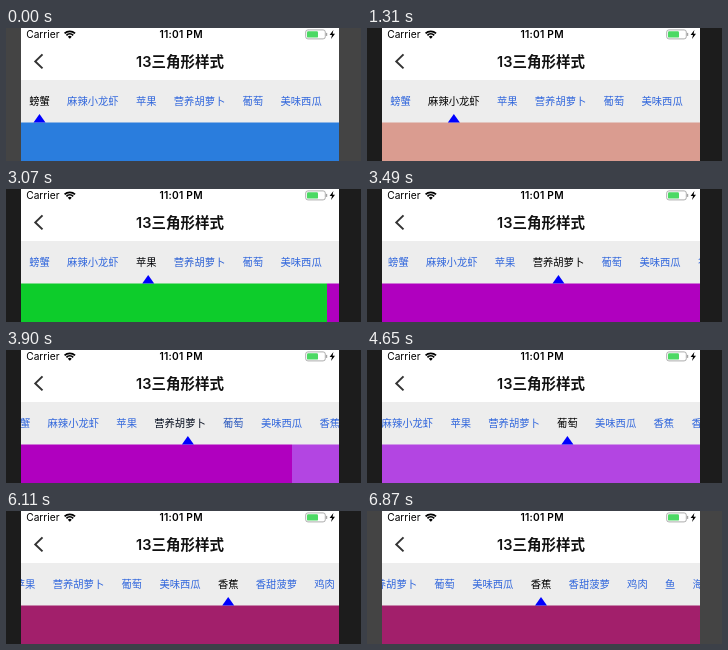
An HTML page with a canvas for the animation above (6.97 s loop, 355x133 px).

```html
<!DOCTYPE html>
<html lang="zh">
<head>
<meta charset="utf-8">
<title>13三角形样式</title>
<style>
html, body { margin: 0; width: 100%; height: 100%; overflow: hidden; background: #1c1c1c; }
canvas { display: block; width: 355px; height: 133px; }
</style>
</head>
<body>
<canvas id="stage"></canvas>
<script>
const W = 355, H = 133, LOOP = 6970;
const LEFT = 15, RIGHT = 333, WIDTH = RIGHT - LEFT, MID = (LEFT + RIGHT) / 2;
const BAR_TOP = 52, BAR_BOTTOM = 94.5;
const EM = 10.3, GAP = 17.3;
const LATIN = 'Inter, "Liberation Sans", sans-serif';
const CJK = '"Noto Sans CJK SC", "Noto Sans CJK", sans-serif';
const NORMAL = [48, 102, 220], SELECTED = [0, 0, 0];
const PAGES = ['#2a7ddd', '#da9c90', '#0dcc2b', '#b000bf', '#b345e2', '#bce030', '#a21f6b'];
const NAMES = ['螃蟹', '麻辣小龙虾', '苹果', '营养胡萝卜', '葡萄', '美味西瓜',
  '香蕉', '香甜菠萝', '鸡肉', '鱼', '海鲜'];

let edge = 23.2;
const tabs = NAMES.map(name => {
  const tab = { name, x: edge, mid: edge + name.length * EM / 2 };
  edge += name.length * EM + GAP;
  return tab;
});
const centred = i => tabs[i].mid - MID;

const linear = k => k;
const easeOut = k => 1 - (1 - k) ** 2.4;
const easeInOut = k => k * k * (3 - 2 * k);

// [time, value, easing used to arrive there]
const pageKeys = [
  [0, 0], [690, 0], [780, 0.467, linear], [990, 0.467], [1310, 1, easeOut],
  [2220, 1], [2370, 1.527, linear], [2570, 1.527], [2890, 2, easeOut],
  [3050, 2], [3070, 2.034, linear], [3190, 2.45, linear], [3440, 3, easeOut],
  [3760, 3], [3900, 3.145, k => k * k], [4020, 3.45, linear], [4220, 3.45], [4520, 4, easeOut],
  [4780, 4], [4890, 4.45, linear], [5100, 5, easeOut],
  [5480, 5], [5630, 5.45, linear], [5770, 5.45], [6090, 6, easeOut]
];
const scrollKeys = [
  [0, 0], [3430, 0], [3730, centred(3), easeInOut],
  [4500, centred(3)], [4800, centred(4), easeInOut],
  [5060, centred(4)], [5340, centred(5), easeInOut],
  [6110, centred(5)], [6400, centred(6), easeInOut]
];

const mix = (a, b, k) => a + (b - a) * k;

function valueAt(keys, t) {
  for (let i = 1; i < keys.length; i++) {
    const [t0, v0] = keys[i - 1], [t1, v1, ease = linear] = keys[i];
    if (t < t1) return mix(v0, v1, ease((t - t0) / (t1 - t0)));
  }
  return keys[keys.length - 1][1];
}

const canvas = document.getElementById('stage');
const ctx = canvas.getContext('2d');
const ratio = window.devicePixelRatio || 1;
canvas.width = W * ratio;
canvas.height = H * ratio;

function rect(x, y, w, h, color) {
  ctx.fillStyle = color;
  ctx.fillRect(x, y, w, h);
}

function label(text, x, y, font, color, align = 'left', spacing = 0) {
  ctx.font = font;
  ctx.fillStyle = color;
  ctx.textAlign = align;
  ctx.letterSpacing = spacing + 'px';
  ctx.fillText(text, x, y);
}

function polygon(points, color) {
  ctx.beginPath();
  points.forEach(([x, y]) => ctx.lineTo(x, y));
  ctx.closePath();
  ctx.fillStyle = color;
  ctx.fill();
}

function wifi(x, y) {
  const from = -Math.PI * 0.75, to = -Math.PI * 0.25;
  ctx.strokeStyle = '#000';
  ctx.lineWidth = 1.8;
  for (const r of [7.4, 4.8]) {
    ctx.beginPath();
    ctx.arc(x, y, r, from, to);
    ctx.stroke();
  }
  ctx.beginPath();
  ctx.moveTo(x, y);
  ctx.arc(x, y, 2.8, from, to);
  ctx.fillStyle = '#000';
  ctx.fill();
}

function battery() {
  ctx.strokeStyle = '#999';
  ctx.lineWidth = 0.8;
  ctx.beginPath();
  ctx.roundRect(299.7, 1.9, 19.6, 9, 2.2);
  ctx.stroke();
  ctx.beginPath();
  ctx.roundRect(301, 3.2, 11, 6.4, 1.2);
  ctx.fillStyle = '#4cd964';
  ctx.fill();
  rect(320.1, 4.9, 1.1, 3, '#999');
  polygon([[327.4, 2], [323.6, 7], [326, 7], [325, 11], [329, 5.8], [326.6, 5.8]], '#000');
}

function header() {
  rect(LEFT, 0, WIDTH, BAR_TOP, '#fff');
  label('Carrier', 20.2, 10.2, '400 10.2px ' + LATIN, '#000');
  wifi(63.8, 10.7);
  label('11:01 PM', MID + 1.1, 10.2, '600 10.2px ' + LATIN, '#000', 'center', 0.25);
  battery();
  label('13三角形样式', MID, 38.7, '600 14.5px Inter, ' + CJK, '#111', 'center');
  ctx.strokeStyle = '#333';
  ctx.lineWidth = 2;
  ctx.beginPath();
  ctx.moveTo(36.5, 26.4);
  ctx.lineTo(29.3, 33.4);
  ctx.lineTo(36.5, 40.4);
  ctx.stroke();
}

function tabBar(page, scroll) {
  tabs.forEach((tab, i) => {
    const near = Math.max(0, 1 - Math.abs(page - i));
    const rgb = NORMAL.map((c, n) => Math.round(mix(c, SELECTED[n], near)));
    label(tab.name, tab.x - scroll, 77.1, `500 ${EM}px ${CJK}`, `rgb(${rgb})`);
  });
  const i = Math.min(Math.floor(page), tabs.length - 2);
  const x = mix(tabs[i].mid, tabs[i + 1].mid, page - i) - scroll;
  polygon([[x, BAR_BOTTOM - 8.5], [x + 6, BAR_BOTTOM], [x - 6, BAR_BOTTOM]], '#00f');
}

function content(page) {
  PAGES.forEach((color, i) => {
    const x = Math.round(LEFT + (i - page) * WIDTH);
    rect(x, BAR_BOTTOM, WIDTH, H - BAR_BOTTOM, color);
  });
}

function draw(t) {
  const page = valueAt(pageKeys, t), scroll = valueAt(scrollKeys, t);
  ctx.setTransform(ratio, 0, 0, ratio, 0, 0);
  rect(0, 0, W, H, t < 720 || t >= 6870 ? '#444' : '#1c1c1c');
  ctx.save();
  ctx.beginPath();
  ctx.rect(LEFT, 0, WIDTH, H);
  ctx.clip();
  header();
  rect(LEFT, BAR_TOP, WIDTH, H - BAR_TOP, '#ededed');
  content(page);
  tabBar(page, scroll);
  ctx.restore();
}

const start = performance.now();
function tick() {
  draw((performance.now() - start) % LOOP);
  requestAnimationFrame(tick);
}
tick();
</script>
</body>
</html>
```
